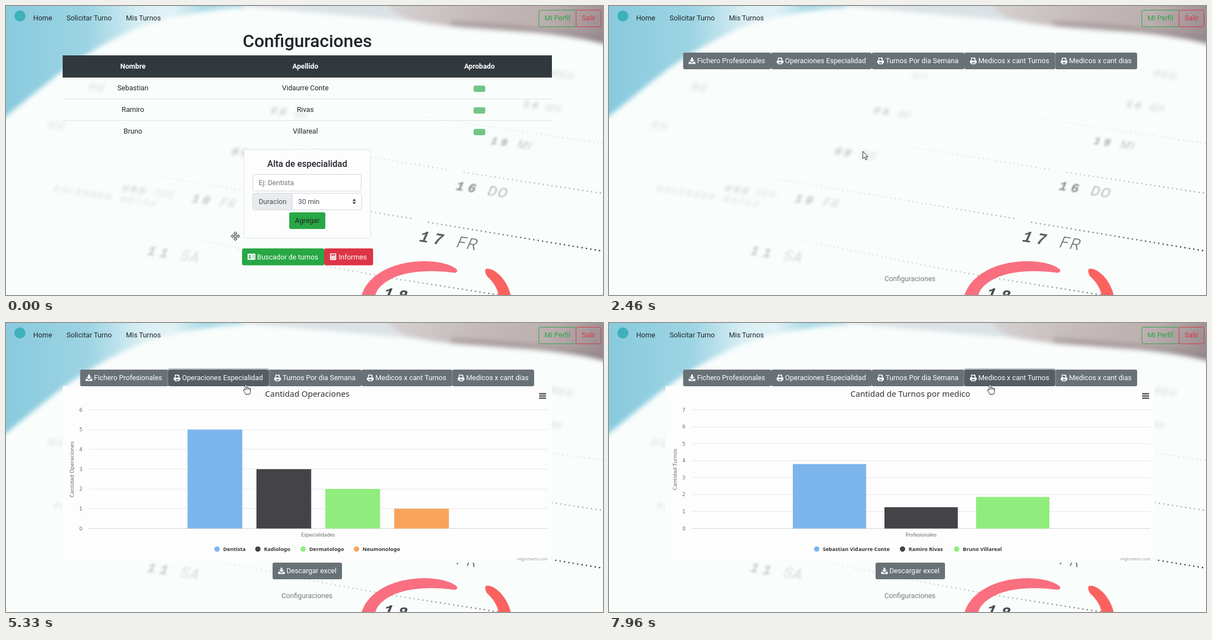
An HTML page that plays this animation: 1075 px wide and 521 px high, repeating every 8000 ms.

```html
<!DOCTYPE html>
<html lang="es">
<head>
<meta charset="utf-8">
<title>Configuraciones</title>
<style>
html, body { margin: 0; width: 100%; height: 100%; overflow: hidden; background: #f9fdfc; }
svg { display: block; font: 12.7px Roboto, sans-serif; fill: #212529; }
.mid { text-anchor: middle; }
.end { text-anchor: end; }
.white { fill: #fff; }
.box { fill: #fff; stroke: #ced4da; }
.chart { font-family: "Noto Sans", sans-serif; fill: #666; }
.num { font-family: "DejaVu Sans", sans-serif; }
</style>
</head>
<body>
<svg id="stage" width="1075" height="521" viewBox="0 0 1075 521">
  <defs>
    <filter id="soft" x="-20%" y="-50%" width="140%" height="200%"><feGaussianBlur stdDeviation="4"/></filter>
    <linearGradient id="cloth" x1="0" y1="0" x2="1" y2="0">
      <stop offset="0" stop-color="#86c9dd"/><stop offset=".36" stop-color="#9dd4e3"/>
      <stop offset=".56" stop-color="#d8eef3"/><stop offset=".68" stop-color="#e2f3f6"/>
      <stop offset=".8" stop-color="#a9d9e6"/><stop offset="1" stop-color="#b9dfe9"/>
    </linearGradient>
    <linearGradient id="skin" x1="0" y1="0" x2="1" y2=".1">
      <stop offset="0" stop-color="#d9d5d6"/><stop offset=".4" stop-color="#c6bcbc"/>
      <stop offset=".75" stop-color="#bbaeae"/><stop offset="1" stop-color="#9a8c90"/>
    </linearGradient>
    <linearGradient id="ink" gradientUnits="userSpaceOnUse" x1="150" y1="0" x2="1075" y2="0">
      <stop offset="0" stop-color="#555" stop-opacity=".03"/><stop offset=".4" stop-color="#555" stop-opacity=".15"/>
      <stop offset=".6" stop-color="#444" stop-opacity=".35"/><stop offset="1" stop-color="#333" stop-opacity=".95"/>
    </linearGradient>
  </defs>
  <g id="photo">
    <rect width="1075" height="521" fill="#f9fdfc"/>
    <g filter="url(#soft)">
      <path d="M-20 -20H450L430 3Q320 8 235 40Q150 78 85 130L-20 215Z" fill="url(#cloth)"/>
      <path d="M425 -20H730V27Q600 16 425 0Z" fill="#dbe2e5"/>
      <path d="M675 -20H1100V75Q1030 53 960 48Q800 40 735 27Q695 18 675 -20Z" fill="url(#skin)"/>
      <path d="M800 32Q960 38 1100 67" fill="none" stroke="#83757a" stroke-width="9" opacity=".45"/>
    </g>
    <g fill="none" stroke="url(#ink)" stroke-linecap="round" stroke-width="2.8" stroke-dasharray="0 8">
      <path d="M200 295L735 384M761 390L1075 442M350 423L560 466 690 490 900 523"/>
      <path d="M500 247L800 296M825 300L1075 338" opacity=".4"/>
      <path d="M520 165L1075 248M190 513L240 521" opacity=".12"/>
    </g>
    <g id="dates"></g>
    <path d="M640 522C650 488 692 460 755 460Q795 461 812 475Q814 480 808 481C765 475 728 478 702 488Q669 502 665 522Z" fill="#f96f7f"/>
    <path d="M864 474Q874 471 890 486Q904 501 909 522H887Q884 503 866 487Q861 479 864 474Z" fill="#fa6260"/>
  </g>
  <g id="nav"></g>
  <g id="settings"></g>
  <g id="reports"></g>
  <g id="cursor" stroke="#222" stroke-linejoin="round">
    <path id="arrow" d="M0 0V13.2L3.1 10.4 5.3 15.6 7.6 14.6 5.4 9.6H9.4Z" fill="#fff"/>
    <path id="hand" d="M-1.4 10V1.2Q-1.4 -.2 0 -.2T1.4 1.2V6Q2.8 4.9 4.1 6.3Q5.4 5.4 6.5 6.9Q8.2 6.4 8.2 8.4V12Q8.2 14.5 6.6 17.5H-.4Q-1 15.4 -4 11.5Q-5 9.8 -3.8 9Q-2.7 8.5 -1.4 10ZM1.4 6V9M4.1 6.3V9M6.5 6.9V9.5" fill="#fff"/>
    <path id="move" d="M0 -8L3 -5H1V-1H5V-3L8 0 5 3V1H1V5H3L0 8 -3 5H-1V1H-5V3L-8 0 -5 -3V-1H-1V-5H-3Z" fill="#fff"/>
  </g>
</svg>
<script>
const LOOP = 8000, PAGE_AT = 1750, FOCUS_AT = 1400;
const $ = id => document.getElementById(id);
const put = (id, ...parts) => $(id).innerHTML = parts.flat(9).join('');
const show = (el, on) => el.setAttribute('visibility', on ? 'inherit' : 'hidden');
const text = (x, y, s, attrs = '') => `<text x="${x}" y="${y}" ${attrs}>${s}</text>`;
const rect = (x, y, w, h, attrs = '') => `<rect x="${x}" y="${y}" width="${w}" height="${h}" ${attrs}/>`;
const mid = 'class="mid"';

const icons = {
  load: '<path d="M4.5 0h3v4h3L6 8.5 1.5 4h3ZM0 7.5h3L6 10.5 9 7.5h3v4H0Z"/>',
  print: '<path fill-rule="evenodd" d="M2 0h6.5L10 1.5V5h.5Q12 5 12 6.5V10h-2v2H2v-2H0V6.5Q0 5 1.5 5H2ZM3.4 1.4V5.5h5.2V3H7V1.4ZM3.4 8.5v2.1h5.2V8.5Z"/>',
  card: '<path fill-rule="evenodd" d="M1 .5h12q1 0 1 1v9q0 1-1 1H1q-1 0-1-1v-9q0-1 1-1ZM4.2 3a1.6 1.6 0 100 3.2 1.6 1.6 0 000-3.2ZM1.7 9h5q0-2.2-2.5-2.2T1.7 9ZM8.5 4h4v1h-4ZM8.5 7h4v1h-4Z"/>',
  calc: '<path fill-rule="evenodd" d="M0 0h11v12H0ZM1.5 1.5v2.5h8V1.5ZM1.5 5.5v1.5H3V5.5ZM4.7 5.5v1.5h1.5V5.5ZM8 5.5v1.5h1.5V5.5ZM1.5 8.7v1.5H3V8.7ZM4.7 8.7v1.5h1.5V8.7ZM8 8.7v1.5h1.5V8.7Z"/>'
};
const icon = (name, x, y) => `<g class="white" transform="translate(${x} ${y})">${icons[name]}</g>`;

// Calendar print: x, y, number, day, size, blur, opacity
const dates = [
  [742, 424, '17', 'FR', 28, .4, .75], [677, 526, '18', '', 28, .5, .85], [808, 331, '16', 'DO', 24, 1.2, .5],
  [871, 248, '19', 'MI', 20, 2, .38], [930, 181, '14', 'MA', 17, 3, .28], [980, 126, 'MES', '', 16, 4, .2],
  [252, 448, '11', 'SA', 25, 2.2, .24], [333, 353, '10', 'FR', 21, 2.4, .28], [405, 267, '09', 'DO', 19, 3, .3],
  [475, 193, '08', 'MI', 18, 3.4, .25], [545, 130, '07', '', 17, 4, .14], [208, 333, 'UND', 'DER', 17, 3, .2],
  [85, 333, 'KALENDER NOTIZ', '', 15, 3.5, .14], [148, 150, '02', '', 17, 4.5, .2], [75, 219, '03', '', 17, 4.5, .17]
];
put('dates', dates.map(([x, y, n, day, size, blur, op]) =>
  `<g transform="translate(${x} ${y}) rotate(9) skewX(-14)" font-size="${size}"
    opacity="${op}" style="filter:blur(${blur}px)">
    ${text(0, 0, n, `font-family="Liberation Mono, monospace" font-weight="700" letter-spacing="${size * .3}"`)}
    ${text(size * (.9 * n.length + .62), 0, day, `font-weight="300" letter-spacing="${size * .1}"`)}</g>`));

const outlined = (x, w, s, color) =>
  rect(x, 7.5, w, 30, `rx="3" fill="none" stroke="${color}"`) + text(x + w / 2, 26, s, `${mid} fill="${color}"`);
put('nav', '<circle cx="25" cy="18" r="10" fill="#3fb1bb"/>',
  text(49, 26, 'Home'), text(109, 26, 'Solicitar Turno'), text(216, 26, 'Mis Turnos'),
  outlined(959.5, 67, 'Mi Perfil', '#28a745'), outlined(1026.5, 45, 'Salir', '#dc3545'));

const people = [['Sebastian', 'Vidaurre Conte'], ['Ramiro', 'Rivas'], ['Bruno', 'Villareal']];
const columns = [228.5, 539, 852.5];
put('settings',
  text(542.5, 74, 'Configuraciones', `${mid} font-size="31.8" font-weight="500"`),
  rect(102, 89, 881, 40, 'fill="#32393e"'),
  ['Nombre', 'Apellido', 'Aprobado'].map((s, i) => text(columns[i], 113, s, 'class="mid white" font-weight="700"')),
  people.map((names, i) => [
    names.map((s, k) => text(columns[k], 152 + 39 * i, s, mid)),
    rect(842, 143.5 + 39 * i, 21, 11.5, 'rx="3" fill="#72c587"'),
    i ? rect(102, 128 + 39 * i, 881, 1, 'fill="#dbe3e5"') : '']),
  rect(428.5, 258.5, 228, 160, 'rx="3" fill="#fdfdfe" stroke="#e0e2e3"'),
  text(542.5, 290, 'Alta de especialidad', `${mid} font-size="15.9" font-weight="500"`),
  rect(444.5, 303.5, 195, 30, 'class="box" rx="3"'),
  text(455, 323, 'Ej: Dentista', 'fill="#6c757d"'),
  rect(444.5, 337.5, 196, 30, 'class="box" rx="3"'),
  rect(444.5, 337.5, 71, 30, 'rx="3" fill="#e9ecef" stroke="#ced4da"'),
  text(455, 357, 'Duracion', 'fill="#495057"'), text(526, 357, '30 min', 'fill="#495057"'),
  '<path d="M624 351.5l3-4 3 4ZM624 353.5l3 4 3-4Z" fill="#343a40"/>',
  rect(510, 372, 65, 30, 'id="add" rx="3"'), text(542.5, 391, 'Agregar', mid),
  rect(425, 437, 148, 30.5, 'rx="3" fill="#28a745"'), icon('card', 435, 446),
  text(452, 457, 'Buscador de turnos', 'class="white"'),
  rect(572, 436, 90, 32.5, 'id="ring" rx="4" fill="none" stroke="#eda0a8" stroke-width="2.5"'),
  rect(573, 437, 88, 30.5, 'id="info" rx="3"'), icon('calc', 583.5, 446),
  text(599, 457, 'Informes', 'class="white"'));

const palette = ['#7cb5ec', '#434348', '#90ed7d', '#f7a35c', '#8085e9', '#f15c80', '#e4d354', '#2b908f', '#f45b5b'];
const charts = [
  { start: 4150, title: 'Cantidad Operaciones', yName: 'Cantidad Operaciones', xName: 'Especialidades', max: 6,
    values: [5, 3, 2, 1], x: 327, step: 124, width: 98.5,
    names: ['Dentista', 'Radiologo', 'Dermatologo', 'Neumonologo'], keys: [380, 453.5, 535, 631] },
  { start: 5971, title: 'Turnos por dia', yName: 'Cantidad Turnos', xName: 'Dias', max: 3,
    values: [1, 1, 1, 1, 2, 1, 1, 2, 1], x: 320, step: 55.1, width: 43.7, numeric: true,
    names: ['01', '02', '05', '06', '11', '15', '18', '20', '30'].map(d => '2020-06-' + d),
    keys: palette.map((_, i) => 135 + 93.7 * i) },
  { start: 7375, title: 'Cantidad de Turnos por medico', yName: 'Cantidad Turnos', xName: 'Profesionales', max: 7,
    values: [6, 2, 3], x: 331, step: 165, width: 132,
    names: people.map(p => p.join(' ')), keys: [374, 528.5, 626] }
];
const TOP = 156.5, BASE = 370.5;
const drawChart = (c, n) => [
  `<g id="chart${n}" class="chart">`, rect(102, 114, 881, 318, 'fill="#fdfdfe"'),
  text(542.5, 133, c.title, `${mid} font-size="14.6" fill="#333"`),
  '<path d="M960 127.5h12.5M960 131.5h12.5M960 135.5h12.5" stroke="#555" stroke-width="2.4"/>',
  Array.from({ length: c.max + 1 }, (_, i) => {
    const y = BASE - (BASE - TOP) * i / c.max;
    return rect(149, Math.round(y - .5), 826, 1, `fill="${i ? '#e6e6e4' : '#d3d6d0'}"`) +
      text(137.5, y + 3, i, 'class="end num" font-size="8.7"');
  }),
  text(0, 0, c.yName, `${mid} font-size="9.7" transform="translate(122 264) rotate(-90)"`),
  text(562, 385, c.xName, `${mid} font-size="8.9"`),
  c.values.map((_, i) => rect(c.x + c.step * i, BASE, c.width, 0, `class="bar" fill="${palette[i]}"`)),
  c.names.map((s, i) => `<circle cx="${c.keys[i]}" cy="407.5" r="4.8" fill="${palette[i]}"/>` +
    text(c.keys[i] + 11, 411.2, s, `font-size="9.5" font-weight="700" fill="#333" ${c.numeric ? 'class="num"' : ''}`)),
  text(975, 428, 'Highcharts.com', 'class="end" font-size="7.25" fill="#999"'), '</g>'];

const edges = [133.5, 292, 473, 640, 803.5, 951];
const tabs = ['Fichero Profesionales', 'Operaciones Especialidad', 'Turnos Por dia Semana', 'Medicos x cant Turnos', 'Medicos x cant dias'];
put('reports',
  tabs.map((_, i) => rect(edges[i], 84, edges[i + 1] - edges[i], 30, 'class="tab" rx="3"')),
  rect(0, 82.8, 0, 32.4, 'id="focus" rx="4" fill="none" stroke="#828a91" stroke-opacity=".5" stroke-width="2.5"'),
  tabs.map((s, i) => icon(i ? 'print' : 'load', edges[i] + 10, 93) + text(edges[i] + 25, 103, s, 'class="white"')),
  charts.map(drawChart),
  '<g id="excel">', rect(480, 432, 125, 30, 'rx="3" fill="#687276"'), icon('load', 490, 441),
  text(505, 451, 'Descargar excel', 'class="white"'), '</g>',
  text(542, 496, 'Configuraciones', `${mid} fill="#75797c"`));

const tabRects = [...document.querySelectorAll('.tab')];
charts.forEach((c, n) => { c.el = $('chart' + n); c.bars = [...c.el.querySelectorAll('.bar')]; });

// Pointer path: time, x, y
const path = [
  [0, 413, 415], [250, 413, 415], [850, 600, 450], [1450, 606, 452], [1670, 538, 404], [2460, 457, 262],
  [3350, 364, 128], [3750, 360, 112], [4100, 382, 104], [4600, 400, 105], [5330, 432, 111],
  [5850, 547, 102], [6550, 547, 102], [7250, 686, 111], [LOOP, 686, 111]
];
const sine = p => (1 - Math.cos(Math.PI * Math.min(1, Math.max(0, p)))) / 2;

function pointer(t) {
  const k = path.findIndex(p => p[0] > t);
  const [t0, x0, y0] = path[k - 1], [t1, x1, y1] = path[k];
  const e = sine((t - t0) / (t1 - t0));
  return [x0 + (x1 - x0) * e, y0 + (y1 - y0) * e];
}

function draw(t) {
  const [x, y] = pointer(t), first = t < PAGE_AT;
  show($('settings'), first);
  show($('reports'), !first);

  const onAdd = x > 510 && x < 575 && y > 372 && y < 406;
  const onInfo = x > 573 && x < 661 && y > 437 && y < 467;
  $('add').setAttribute('fill', onAdd ? '#218838' : '#28a745');
  $('info').setAttribute('fill', onInfo || t > FOCUS_AT ? '#c22030' : '#dc3545');
  show($('ring'), first && t > FOCUS_AT);

  const current = charts.findLastIndex(c => t >= c.start);
  const hover = y > 84 && y < 114 ? edges.findIndex((e, i) => x >= e && x < edges[i + 1]) : -1;
  tabRects.forEach((r, i) => r.setAttribute('fill', i === hover ? '#555f63' : '#687276'));
  show($('excel'), !first && current >= 0);
  show($('focus'), !first && current >= 0);
  if (current >= 0) {
    $('focus').setAttribute('x', edges[current + 1] - 1.2);
    $('focus').setAttribute('width', edges[current + 2] - edges[current + 1] + 2.4);
  }
  charts.forEach((c, n) => {
    show(c.el, n === current);
    if (n !== current) return;
    c.bars.forEach((bar, i) => {
      const h = (BASE - TOP) * c.values[i] / c.max * sine((t - c.start - 4 * i) / 1000);
      bar.setAttribute('y', BASE - h);
      bar.setAttribute('height', h);
    });
  });

  const kind = t < 350 ? 'move' : (first && onInfo) || (hover >= 0 && t > 3800) ? 'hand' : 'arrow';
  for (const id of ['arrow', 'hand', 'move']) show($(id), id === kind);
  $('cursor').setAttribute('transform', `translate(${x} ${y})`);
}

const begin = performance.now();
function tick() {
  draw((performance.now() - begin) % LOOP);
  requestAnimationFrame(tick);
}
tick();
</script>
</body>
</html>
```
